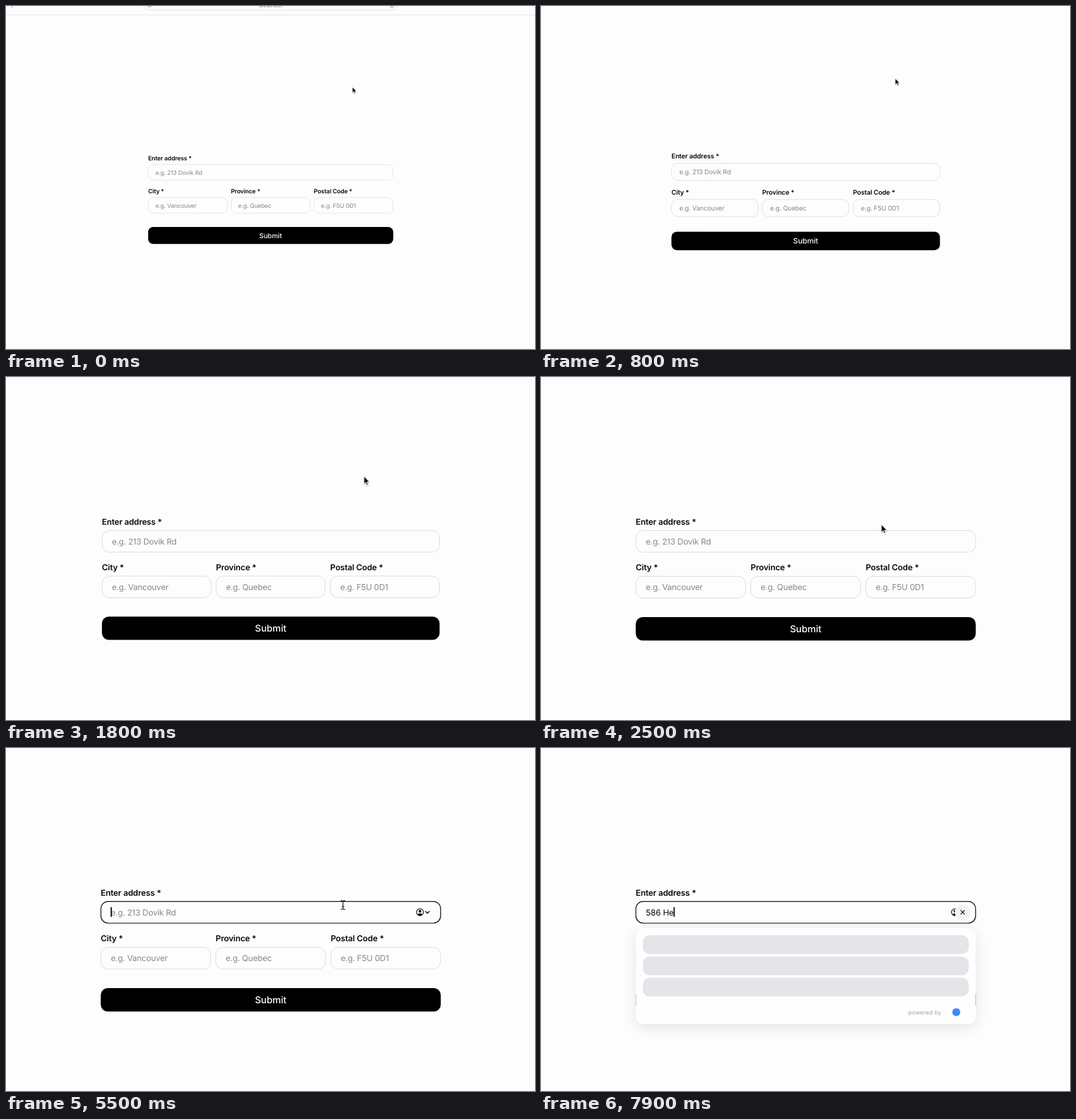
These frames come from a looping animation (800x520 px, 8000 ms). An HTML page:

```html
<!DOCTYPE html>
<html lang="en">
<head>
<meta charset="utf-8">
<title>Address form</title>
<style>
  html, body { margin: 0; width: 100%; height: 100%; overflow: hidden; background: #fdfdfe; }
  svg { display: block; width: 800px; height: 520px; }
  text { font: 12.5px Inter, sans-serif; white-space: pre; text-rendering: geometricPrecision; }
  .label { font-weight: 600; letter-spacing: -.012em; fill: #09090b; }
  .hint { letter-spacing: -.016em; fill: #88888c; }
  #typed { letter-spacing: -.01em; fill: #09090b; }
  .box { fill: #fdfdfe; stroke: #dcdce0; }
  .line { fill: none; stroke: #111; stroke-width: 1.2; stroke-linecap: round; stroke-linejoin: round; }
  .bar { fill: none; stroke: #e4e4e6; stroke-width: 1.3; }
  #panel { filter: drop-shadow(0 5px 10px rgba(0, 0, 0, .1)); }
</style>
</head>
<body>
<svg viewBox="0 0 800 520">
  <g id="camera">
    <g id="toolbar">
      <path class="bar" d="M-200 -82H1000"/>
      <rect class="bar" x="134.5" y="-120" width="531" height="27.5" rx="8"/>
      <text x="400" y="-98" text-anchor="middle" style="font-size:11.5px" fill="#77777b">localhost</text>
      <path class="bar" style="stroke:#88888c" d="M142 -99.5h8M-140 -106l-5 5M-145 -101l4 4"/>
      <circle class="bar" style="stroke:#88888c" cx="655" cy="-102.5" r="4.5"/>
    </g>
    <g id="form"></g>
    <rect x="143.3" y="364" width="514.2" height="35.6" rx="10.5"/>
    <text x="400.3" y="387.2" text-anchor="middle" style="font-size:14.3px;font-weight:500" fill="#fff">Submit</text>

    <rect id="focus" class="line" x="143.5" y="232.6" width="513.8" height="32.9" rx="11"/>
    <text id="typed" x="158.5" y="253.6"></text>
    <g id="contact">
      <circle class="line" cx="626" cy="249" r="5.2"/>
      <circle cx="626" cy="247.4" r="2"/>
      <path d="M622.2 252.4Q626 248.6 629.8 252.4Q626 256 622.2 252.4Z"/>
      <path class="line" style="stroke-width:1.4" d="M634.4 247.7l2.9 2.9 2.9-2.9"/>
    </g>
    <g id="clear">
      <circle cx="637.7" cy="249" r="12" fill="#f3f3f5"/>
      <path class="line" d="M634.9 246.2l5.6 5.6M640.5 246.2l-5.6 5.6"/>
    </g>
    <rect id="caret" y="241.3" width="1.7" height="14.6"/>

    <g id="panel">
      <rect x="143.3" y="273" width="514.2" height="145.3" rx="11" fill="#fefeff"/>
      <g id="bones" fill="#e4e4e9"></g>
      <text x="555.6" y="404" style="font-size:8.6px;letter-spacing:.02em" fill="#a0a0a6">powered by</text>
      <circle cx="628" cy="400.5" r="6" fill="#4285f4"/>
    </g>

    <g id="pointer">
      <path id="arrow" d="M0 0V11.6L2.6 9.2L4.4 13.2L6.2 12.4L4.5 8.5H8.2Z" stroke="#fff" stroke-width=".9"
        style="filter:drop-shadow(0 1px 1px rgba(0,0,0,.3))"/>
      <path id="beam" class="line" style="stroke-width:1.1" d="M-2.8 -6.6Q0 -6.6 0 -4.8Q0 -6.6 2.8 -6.6M0 -4.8V4.8M-2.8 6.6Q0 6.6 0 4.8Q0 6.6 2.8 6.6M-1.5 2.2H1.5"/>
    </g>
  </g>
</svg>
<script>
const $ = id => document.getElementById(id);
const clamp = v => Math.min(1, Math.max(0, v));
const mix = (a, b, p) => a + (b - a) * p;
const span = (t, from, to) => clamp((t - from) / (to - from));
const easeCubic = x => x < .5 ? 4 * x ** 3 : 1 - 4 * (1 - x) ** 3;
const easeSine = x => (1 - Math.cos(Math.PI * x)) / 2;
const show = (id, opacity) => $(id).setAttribute('opacity', +opacity);

const field = (x, y, width, label, hint) => `
  <text class="label" x="${x - .2}" y="${y - 9}">${label} *</text>
  <rect class="box" x="${x}" y="${y}" width="${width}" height="32.9" rx="11"/>
  <text class="hint" x="${x + 15}" y="${y + 21.2}">e.g. ${hint}</text>`;

$('form').innerHTML =
  field(143.5, 232.6, 513.8, 'Enter address', '213 Dovik Rd') +
  field(143.5, 302.2, 166, 'City', 'Vancouver') +
  field(317.2, 302.2, 166, 'Province', 'Quebec') +
  field(491.2, 302.2, 166, 'Postal Code', 'F5U 0D1');
$('bones').innerHTML = [284, 316.2, 348.3].map(y =>
  `<rect x="154" y="${y}" width="492.8" height="28.3" rx="10"/>`).join('');

const hint = document.querySelector('.hint');
const entry = '586 He';
const keyTimes = [5.8, 6.1, 6.4, 7, 7.6, 7.8];

function draw() {
  const t = performance.now() % 8000 / 1000;

  const zoom = mix(.7206, 1, easeCubic(span(t, -.14, 2.24)));
  $('camera').setAttribute('transform', `translate(400 260) scale(${zoom}) translate(-400 -260)`);

  const move = easeSine(span(t, .77, 2.9));
  const y = mix(70, 238, move);
  $('pointer').setAttribute('transform', `translate(${mix(572, 509.6, move)} ${y})`);
  const typing = t >= keyTimes[0];
  show('arrow', y < 232);
  show('beam', y >= 232 && !typing);

  const focused = t >= 3.5;
  show('focus', span(t, 3.42, 3.7));
  show('contact', focused);

  $('typed').textContent = entry.slice(0, keyTimes.filter(k => t >= k).length);
  hint.setAttribute('opacity', +!typing);
  const blink = (t - 3.5) % 1;
  show('caret', focused && (typing ? 1 : clamp(Math.max(1 - (blink - .5) / .2, (blink - .8) / .2))));
  $('caret').setAttribute('x', 158.3 + (typing ? $('typed').getComputedTextLength() : 0));

  show('clear', typing);
  show('panel', span(t, 5.75, 5.95));
  show('bones', .75 + .25 * Math.cos(Math.PI * (t - 5.9)));

  requestAnimationFrame(draw);
}
draw();
</script>
</body>
</html>
```
